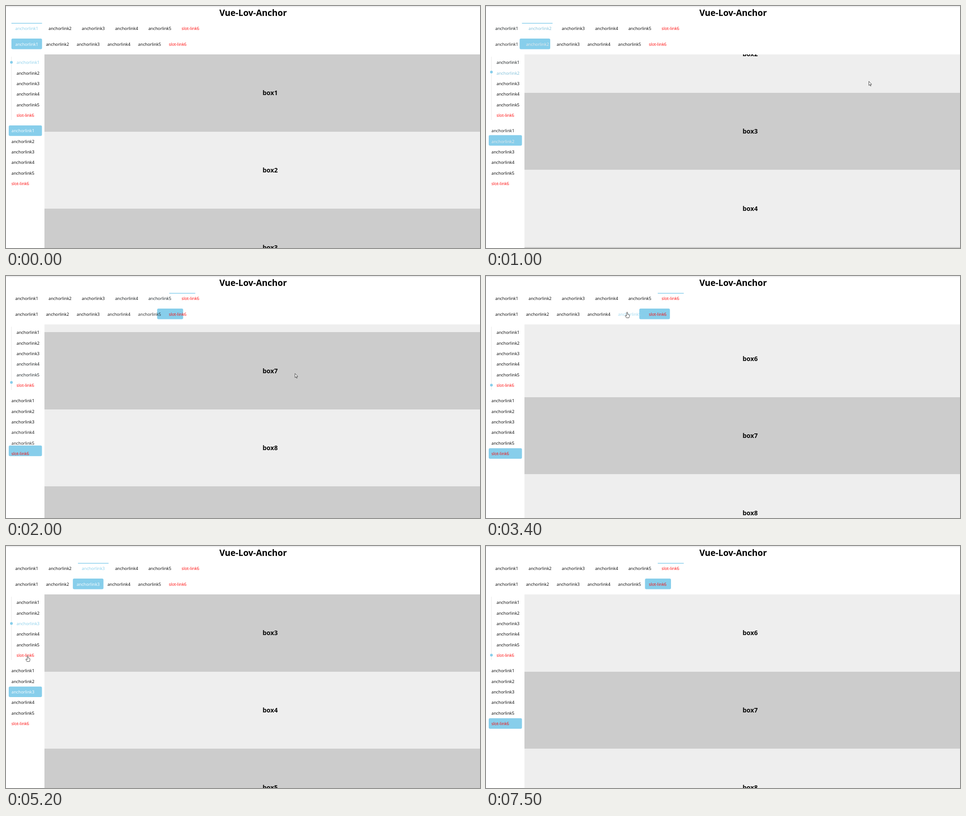
Write an HTML page with a canvas that moves like this. It is 1048 by 535 pixels and loops after 9000 ms.

```html
<!DOCTYPE html>
<html>
<head>
<meta charset="utf-8">
<title>Vue-Lov-Anchor</title>
<style>
  html, body { margin: 0; width: 100%; height: 100%; overflow: hidden; background: #fff; }
  canvas { display: block; }
</style>
</head>
<body>
<canvas id="stage" width="1048" height="535"></canvas>
<script>
const ctx = document.getElementById('stage').getContext('2d');
const LOOP = 9000, STEP = 100, FADE = 300;
const POLL = 58, FIRST_POLL = 50; // the scroll listener is throttled
const FONT = '"Open Sans", "Noto Sans", sans-serif';
const SKY = [135, 206, 235], BLACK = [0, 0, 0], WHITE = [255, 255, 255];
const BOX = 170.6, TOP = 107, LEFT = 85, LINE = 23.35;
const labels = [1, 2, 3, 4, 5].map(n => 'anchorlink' + n).concat('slot-link6');

const navs = [
  { x: 12, y: 37.6, dx: 73.55, dy: 0, tx: 8.5, ty: 15.4, w: 67.7, h: 23.5, on: SKY, mark: 'line' },
  { x: 12, y: 72, dx: 67.9, dy: 0, tx: 8.5, ty: 16, w: 67.7, h: 23.5, on: WHITE, mark: 'pill' },
  { x: 12, y: 113, dx: 0, dy: LINE, tx: 11.3, ty: 15.3, w: 64, h: LINE, on: SKY, mark: 'dot' },
  { x: 6, y: 264, dx: 0, dy: LINE, tx: 6, ty: 15.3, w: 73.5, h: LINE, on: WHITE, mark: 'pill' }
];

const clicks = [
  { nav: 1, link: 4, at: 3355, ms: 144 },
  { nav: 2, link: 2, at: 4456, ms: 144 },
  { nav: 3, link: 5, at: 6041, ms: 101 }
];

// Moves: [start, duration, ...destination]
const scrollMoves = [
  [560, 566, 1.6 * BOX], [1126, 505, 3.56 * BOX], [1680, 392, 6 * BOX],
  ...clicks.map(c => [c.at, c.ms, c.link * BOX])
];
const cursorMoves = [
  [100, 100, 846, 166], [1700, 300, 638.5, 215], [2000, 200, 508, 195], [2300, 800, 312, 81],
  [3700, 400, 53, 165], [4800, 1100, 39, 382], [6900, 300, 470, 150]
];

const lerp = (a, b, k) => a + (b - a) * k;
const mix = (a, b, k) => a.map((v, i) => lerp(v, b[i], k));
const rgb = c => `rgb(${c.map(Math.round)})`;
const linear = k => k;
const sineOut = k => Math.sin(k * Math.PI / 2);

// CSS "ease" timing curve
function ease(x) {
  if (x >= 1) return 1;
  let lo = 0, hi = 1, s;
  for (let i = 0; i < 20; i++) {
    s = (lo + hi) / 2;
    if (.75 * s * (1 - s) + s ** 3 < x) lo = s; else hi = s;
  }
  return .3 * s * (1 - s) ** 2 + 3 * s * s * (1 - s) + s ** 3;
}

function follow(moves, start, easing, t) {
  return moves.reduce((pos, [at, ms, ...to]) =>
    t > at ? mix(pos, to, easing(Math.min(1, (t - at) / ms))) : pos, start);
}

const scrollAt = t => follow(scrollMoves, [0], sineOut, t)[0];
const cursorAt = t => follow(cursorMoves, [916, 98], linear, t);

// A clicked nav jumps straight to its link; the others read the scroll position
navs.forEach((nav, n) => {
  const own = clicks.filter(c => c.nav === n);
  nav.events = own.map(c => [c.at, c.link]);
  for (let t = FIRST_POLL; t < LOOP; t += POLL) {
    if (own.some(c => t >= c.at && t < c.at + c.ms)) continue;
    nav.events.push([t, Math.min(5, Math.floor(scrollAt(t) / BOX + 1e-6))]);
  }
  nav.events.sort((a, b) => a[0] - b[0]);
});

// Marker position followed by the highlight amount of each link
const pose = index => [index, ...labels.map((_, i) => +(i === index))];

function navState(events, t) {
  let from = pose(0), start = -FADE, target = 0;
  const at = time => mix(from, pose(target), ease((time - start) / FADE));
  for (const [time, index] of events) {
    if (time > t) break;
    if (index === target) continue;
    from = at(time);
    start = time;
    target = index;
  }
  return { target, values: at(t) };
}

function hovered(nav, [x, y]) {
  return labels.findIndex((_, i) => {
    const px = x - nav.x - nav.dx * i, py = y - nav.y - nav.dy * i;
    return px >= 0 && px < nav.w && py >= 0 && py < nav.h;
  });
}

function text(str, x, y, size, color, weight) {
  ctx.font = `${weight} ${size}px ${FONT}`;
  ctx.fillStyle = color;
  ctx.fillText(str, x, Math.round(y));
}

function rect(x, y, w, h, color, radius = 0) {
  ctx.fillStyle = color;
  ctx.beginPath();
  ctx.roundRect(x, y, w, h, radius);
  ctx.fill();
}

function drawBoxes(scroll) {
  ctx.save();
  ctx.beginPath();
  ctx.rect(LEFT, TOP, 963, 428);
  ctx.clip();
  ctx.textAlign = 'center';
  for (let i = 0; i < 10; i++) {
    const y = TOP + i * BOX - scroll, top = Math.round(y);
    rect(LEFT, top, 963, Math.round(y + BOX) - top, i % 2 ? '#eee' : '#ccc');
    text('box' + (i + 1), 584, y + 90.3, 14.15, '#0a0a0a', 700);
  }
  ctx.restore();
}

function drawNav(nav, t, hover) {
  const { target, values: [p, ...amounts] } = navState(nav.events, t);
  const x = nav.x + nav.dx * p, y = nav.y + nav.dy * p;
  const w = nav.dx && target === 5 ? 57.5 : nav.w;
  if (nav.mark === 'line') rect(x, y, w, 1.5, rgb(SKY));
  if (nav.mark === 'pill') rect(x, y, w, nav.h, rgb(SKY), 3);
  if (nav.mark === 'dot') {
    rect(11.5, 112, 1, 140, '#e8e8e8');
    rect(x - 3, y + 8.5, 6, 6, rgb(SKY), 3);
  }
  labels.forEach((label, i) => {
    const base = i === hover ? SKY : BLACK;
    const color = i === 5 ? '#f00' : rgb(mix(base, nav.on, amounts[i]));
    text(label, nav.x + nav.tx + nav.dx * i, nav.y + nav.ty + nav.dy * i, 9.25, color, 500);
  });
}

const arrow = new Path2D('M.5 .5V9.6L2.6 7.7 4 11 5.3 10.4 3.9 7.2H6.7Z');
const hand = new Path2D('M-1 6V-.5Q0-2 1-.5V3.5L4 4.3Q5 4.6 5 6V8.5L4 11.5H-1.5L-4 7.5Q-4.5 6-3 6L-1 7.5Z');

function drawCursor([x, y], pointing) {
  ctx.save();
  ctx.translate(x, y);
  ctx.lineWidth = .8;
  ctx.lineJoin = 'round';
  ctx.fillStyle = '#fff';
  ctx.strokeStyle = '#222';
  const shape = pointing ? hand : arrow;
  ctx.fill(shape);
  ctx.stroke(shape);
  ctx.restore();
}

function draw(t) {
  rect(0, 0, 1048, 535, '#fff');
  rect(0, 1, 1048, 1, '#d4d4d8');
  ctx.textAlign = 'center';
  text('Vue-Lov-Anchor', 546.3, 22, 19, '#000', 700);
  drawBoxes(scrollAt(t));
  ctx.textAlign = 'left';

  const cursor = cursorAt(t);
  const visible = t >= 100 && t < 7500;
  const hovers = navs.map(nav => visible ? hovered(nav, cursor) : -1);
  navs.forEach((nav, i) => drawNav(nav, t, hovers[i]));
  if (visible) drawCursor(cursor, hovers.some(h => h >= 0));
}

// The picture advances in steps of 100 ms
function frame() {
  draw(Math.floor(performance.now() % LOOP / STEP) * STEP);
  requestAnimationFrame(frame);
}
frame();
</script>
</body>
</html>
```
